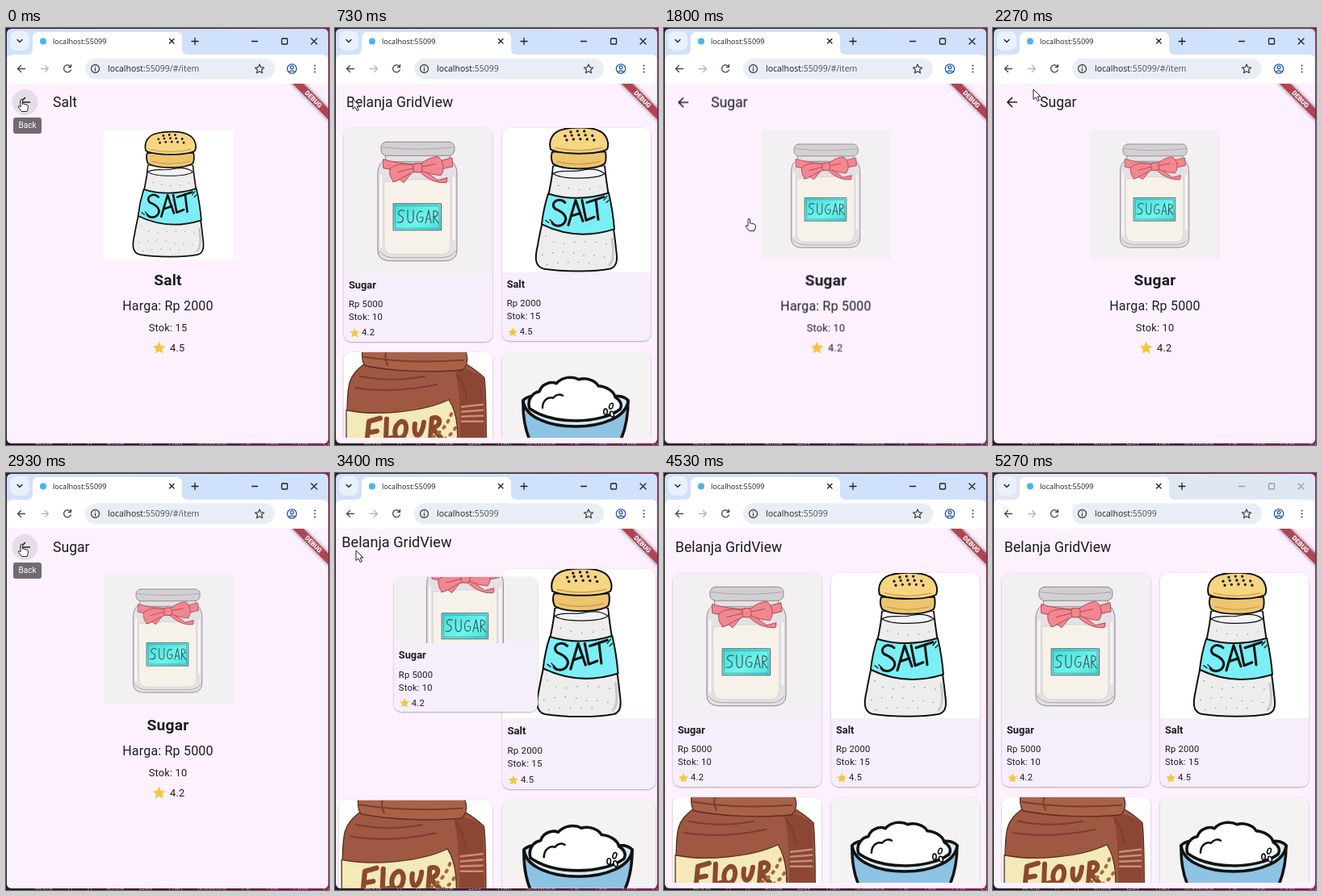
Write an HTML page that moves like this. It is 400 px wide and 517 px high and loops after 5340 ms.

```html
<!DOCTYPE html>
<html lang="id">
<head>
<meta charset="utf-8">
<title>Belanja GridView</title>
<style>
  :root { --t: 5340ms; }
  html, body { margin: 0; width: 100%; height: 100%; overflow: hidden; }
  .stage { position: relative; width: 400px; height: 517px; overflow: hidden;
    background: linear-gradient(90deg, #2a1a2c, #4a1838 60%, #8a1d5c); font-family: Roboto, sans-serif; color: #1d1b20; }
  .stage *, .stage { box-sizing: border-box; }
  .layer { position: absolute; left: 0; top: 0; width: 400px; height: 517px; }
  svg { display: block; }
  p { margin: 0; position: absolute; white-space: nowrap; }
  .below { left: 36px; top: 512px; font-size: 10px; line-height: 12px; color: #a5809a; word-spacing: 16px; }

  /* browser frame */
  .bar { animation: blur-bar var(--t) step-end infinite; }
  .ctl { animation: blur-ctl var(--t) step-end infinite; }
  .tab-title, .url { font-family: "Open Sans", sans-serif; }
  .tab-title { font-size: 9.1px; }
  .url { font-size: 10.5px; }
  .path { animation: path-on var(--t) step-end infinite; }
  @keyframes blur-bar { 0% { fill: #d0e1fb } 92% { fill: #dfe7f3 } }
  @keyframes blur-ctl { 0% { stroke: #1f1f1f } 92% { stroke: #999da3 } }
  @keyframes path-on { 0%, 28.8% { visibility: visible } 8.6%, 62% { visibility: hidden } }

  /* pages */
  .page { clip-path: inset(69px 1px 2px 1px round 0 0 6px 6px); background: #fdf1ff; }
  .title { font-size: 17.6px; line-height: 24px; top: 79.5px; }
  .grid { transform-origin: 200px 292px; animation: grid-zoom var(--t) linear infinite; }
  .cells { clip-path: inset(115px 0 9px 0); }
  .card { position: absolute; width: 184px; height: 264.5px; border-radius: 9.6px; overflow: hidden;
    background: #f6eefb; }
  .shade { position: absolute; width: 184px; height: 264.5px; border-radius: 9.6px;
    box-shadow: 0 .8px 2px rgba(0,0,0,.38); }
  .shade .card { width: 100%; height: 100%; }
  .pic { position: absolute; left: 0; top: 0; width: 100%; height: calc(100% - 85px); }
  .card p { left: 6px; font-size: 11.2px; line-height: 16px; letter-spacing: .2px; }
  .card .name { font-size: 12.8px; font-weight: 700; bottom: 62px; letter-spacing: 0; }
  .card .star { position: absolute; left: 6px; bottom: 3.5px; width: 14.4px; height: 14.4px; }
  .press { position: absolute; left: 8px; top: 121px; width: 189px; height: 271px;
    animation: press var(--t) step-end infinite; }
  .detail { background: #fdf1ff; transform-origin: 200px 292px; }
  .detail p { left: 0; width: 401px; text-align: center; letter-spacing: .2px; }
  .detail .title { left: 58px; text-align: left; letter-spacing: 0; }
  .detail .pic { left: 121px; top: 127px; width: 160px; height: 160px; }
  .detail .star { position: absolute; left: 180.4px; top: 387px; width: 19.2px; height: 19.2px; }
  .detail .num { left: 203px; text-align: left; top: 389px; font-size: 12.8px; line-height: 16px; }
  .tip { position: absolute; left: 9px; top: 111px; width: 35px; height: 20px; border-radius: 3px;
    background: #706b71; color: #fff; font-size: 10px; line-height: 20px; text-align: center; }

  @keyframes grid-zoom {
    0%, 8.33% { transform: scale(1.05); animation-timing-function: ease-in }
    10.39% { transform: scale(1.032); animation-timing-function: cubic-bezier(.1,.6,.2,1) }
    13.6%, 28.46% { transform: none; animation-timing-function: cubic-bezier(.4,0,.2,1) }
    34.08%, 61.61% { transform: scale(1.05); animation-timing-function: ease-in }
    63.67% { transform: scale(1.032); animation-timing-function: cubic-bezier(.1,.6,.2,1) }
    67.42%, 100% { transform: none }
  }
  @keyframes press {
    0%, 28.46% { background: transparent }
    22% { background: #f3e9f5 }
    26.2% { background: #e0d8e2 }
  }
  #salt-slot { animation: salt-slot var(--t) step-end infinite; }
  #sugar-slot { animation: sugar-slot var(--t) step-end infinite; }
  @keyframes salt-slot { 0% { visibility: hidden } 14.14% { visibility: visible } }
  @keyframes sugar-slot { 0%, 67.42% { visibility: visible } 28.46% { visibility: hidden } }

  #salt-page { animation: salt-page var(--t) linear infinite; }
  #salt-page .pic, #salt-page .hover, #salt-page .tip { animation: salt-rest var(--t) step-end infinite; }
  #sugar-page { animation: sugar-page var(--t) linear infinite; }
  #sugar-page .pic { animation: sugar-rest var(--t) step-end infinite; }
  #sugar-page .hover { animation: sugar-hover var(--t) linear infinite; }
  #sugar-page .tip { animation: sugar-tip var(--t) linear infinite; }
  @keyframes salt-page {
    0%, 8.33% { opacity: 1; transform: none }
    10.1% { opacity: 0; transform: scale(.95) }
    100% { opacity: 0 }
  }
  @keyframes salt-rest { 0% { visibility: visible } 8.33% { visibility: hidden } }
  @keyframes sugar-page {
    0%, 28.46% { opacity: 0; transform: scale(.85) }
    29.2% { opacity: 0; transform: scale(.87) }
    30% { opacity: 1; transform: scale(.92); animation-timing-function: ease-out }
    34.08%, 61.61% { opacity: 1; transform: none }
    63.3% { opacity: 0; transform: scale(.95) }
    100% { opacity: 0; transform: scale(.85) }
  }
  @keyframes sugar-rest { 0%, 61.61% { visibility: hidden } 34.08% { visibility: visible } }
  @keyframes sugar-hover { 0%, 46.5% { opacity: 0 } 47%, 61.5% { opacity: 1 } 62%, 100% { opacity: 0 } }
  @keyframes sugar-tip { 0%, 47% { opacity: 0 } 49.5%, 61.5% { opacity: 1 } 62%, 100% { opacity: 0 } }

  /* shared-element flights */
  #salt-fly { animation: salt-fly var(--t) linear infinite, salt-air var(--t) step-end infinite; }
  #sugar-fly { animation: sugar-fly var(--t) linear infinite, sugar-air var(--t) step-end infinite; }
  #push-fly { animation: push-fly var(--t) linear infinite, push-air var(--t) step-end infinite; }
  @keyframes salt-fly {
    0%, 8.33% { left: 124px; top: 130px; width: 154px; height: 154px; animation-timing-function: ease-in }
    10.39% { left: 150px; top: 129.5px; width: 178px; height: 165px; animation-timing-function: cubic-bezier(.15,.55,.4,1) }
    14.14%, 100% { left: 207px; top: 124px; width: 184px; height: 264.5px }
  }
  @keyframes sugar-fly {
    0%, 61.61% { left: 124px; top: 130px; width: 154px; height: 154px; animation-timing-function: ease-in }
    63.67% { left: 74px; top: 129.5px; width: 178px; height: 165px; animation-timing-function: cubic-bezier(.15,.55,.4,1) }
    67.42%, 100% { left: 11px; top: 124px; width: 184px; height: 264.5px }
  }
  @keyframes push-fly {
    0%, 28.46% { left: 8px; top: 121px; width: 190px; height: 271px; animation-timing-function: ease-in }
    30.52% { left: 36px; top: 122px; width: 190px; height: 208px; animation-timing-function: cubic-bezier(.15,.55,.3,1) }
    34.08%, 100% { left: 121px; top: 127px; width: 160px; height: 160px }
  }
  @keyframes salt-air { 0%, 14.14% { visibility: hidden } 8.33% { visibility: visible } }
  @keyframes sugar-air { 0%, 67.42% { visibility: hidden } 61.61% { visibility: visible } }
  @keyframes push-air { 0%, 34.08% { visibility: hidden } 28.46% { visibility: visible } }

  /* pointer */
  .pointer { position: absolute; left: 0; top: 0; overflow: visible; animation: move var(--t) ease-in-out infinite; }
  .arrow { animation: arrow var(--t) step-end infinite; }
  .hand { animation: hand var(--t) step-end infinite; }
  @keyframes move {
    0%, 9% { transform: translate(19px, 88px) }
    13%, 17% { transform: translate(22px, 88px) }
    25.5%, 34% { transform: translate(105px, 236px) }
    41.5%, 43% { transform: translate(50px, 76px) }
    48%, 61.6% { transform: translate(19px, 88px) }
    63.67%, 65% { transform: translate(26px, 96px) }
    71.8%, 73.5% { transform: translate(317px, 83px) }
    81%, 100% { transform: translate(396px, -22px) }
  }
  @keyframes arrow {
    0%, 22%, 46.5%, 81% { visibility: hidden }
    9%, 34.5%, 62% { visibility: visible }
  }
  @keyframes hand {
    0%, 22%, 46.5% { visibility: visible }
    9%, 34.5%, 62% { visibility: hidden }
  }
</style>
</head>
<body>
<svg width="0" height="0" style="position:absolute">
  <defs>
    <symbol id="star" viewBox="0 0 24 24">
      <path fill="#f4c53d" d="M12 17.27L18.18 21l-1.64-7.03L22 9.24l-7.19-.61L12 2 9.19 8.63 2 9.24l5.46 4.73L5.82 21z"/>
    </symbol>
    <linearGradient id="aqua" x2="1" y2="1">
      <stop stop-color="#3fdcd8"/><stop offset=".6" stop-color="#6ff5ee"/><stop offset="1" stop-color="#44dbd8"/>
    </linearGradient>

    <g id="sugar" stroke-linejoin="round" stroke-linecap="round">
      <path fill="#f2f0f2" d="M0 0H184V184H0z"/>
      <g stroke="#8d8489">
        <path fill="#e4e0e4" d="M50 42C44 46 42 52 42 60V154Q42 166 56 167H126Q140 166 140 154V60C140 52 138 46 132 42z"/>
        <path fill="#f6f2e9" stroke="#d9d3cf" d="M50 69Q91 63 132 69V148Q131 158 122 159H60Q51 158 50 148z"/>
        <path fill="none" stroke="#faf8fa" stroke-width="2.500" d="M46 62V150M136 64V140"/>
        <path fill="none" stroke="#aaa2a8" d="M44 155Q50 163 62 163H122Q134 162 138 155"/>
        <path fill="#e4e1e5" d="M52 34H131V44H52z"/>
        <rect x="46" y="19.500" width="91" height="17" rx="7" fill="#d3d0d4"/>
        <path fill="none" stroke="#aaa4a9" d="M48 26Q91 31 135 26"/>
      </g>
      <g fill="#f3868f" stroke="#a84d5b">
        <path d="M49 41Q88 53 134 39L135 50Q90 63 49 52z"/>
        <path d="M87 54L74 70 69 66 60 69 81 53zM97 53L116 67 128 64 127 70Q110 72 93 56z"/>
        <path d="M88 49C77 46 64 46 57 53 56 60 58 66 63 69 74 63 83 58 89 56zM95 47C101 42 111 37 117 38 124 44 125 54 120 61 110 60 102 58 96 55z"/>
        <rect x="86" y="46" width="11" height="11" rx="3"/>
        <path fill="none" d="M86 52L67 57M98 50L113 47"/>
      </g>
      <rect x="61.500" y="96" width="59" height="33" fill="url(#aqua)" stroke="#5d6064"/>
      <rect x="64" y="98.500" width="54" height="28" fill="none" stroke="#2f8f92" stroke-width=".7"/>
      <path fill="none" stroke="#41595d" stroke-width="1.200" d="M75 105C68 102 65 109 70 111 76 113 74 121 66 119M79 104V114C79 122 86 121 86 114V104M97 106C90 102 88 119 94 119 98 119 98 115 98 113H94M101 120L105 104 108 120M102 115H107M111 120V105C118 104 118 112 111 112L117 120"/>
    </g>

    <g id="salt" stroke="#111" stroke-width="2" stroke-linejoin="round" stroke-linecap="round">
      <path fill="#fff" stroke="none" d="M0 0H184V184H0z"/>
      <path fill="#eeedee" d="M63 50C61 80 50 112 44 148 40 165 41 174 51 177 75 181 115 181 134 177 143 174 143 165 141 152 138 120 130 80 127 50z"/>
      <path fill="#fff" stroke="none" d="M64 50H126L127 59Q95 68 63 59z"/>
      <path fill="#f4f3f4" stroke-width="1.200" d="M63 59C73 53 88 58 98 55 112 52 122 55 127 59 118 66 74 67 63 59z"/>
      <path fill="none" stroke="#c9c8ca" stroke-width="3" d="M136 140Q140 166 133 172"/>
      <path fill="#7beff5" d="M57 84Q93 95 132 83 137 104 139 128 92 143 49 122 51 103 57 84z"/>
      <path fill="none" stroke-width="3" d="M78 95C70 87 58 96 66 103 76 107 82 113 77 120 72 126 64 124 62 120M82 123L91 92 100 118M85 112L97 108M99 92L104 117 114 113M105 95L126 88M116 91L119 116"/>
      <path fill="none" stroke-width="1.300" d="M126 92l4-5M129 95l3-3M54 117l4 3M59 116l3 3"/>
      <path fill="none" stroke="#777" stroke-width="1.400" stroke-dasharray="0 13" d="M54 136Q64 150 88 144 120 142 134 148M50 160Q80 152 104 162 124 158 136 168M56 172Q86 166 120 172M70 74Q100 84 124 74"/>
      <path fill="#eec56f" d="M62 32C60 38 61 43 63 47 75 55 115 55 127 47 129 43 129 38 128 32z"/>
      <path fill="#f6d583" d="M60 29C57 18 62 7 76 4 88 1 111 1 120 6 130 10 133 22 130 29 118 36 73 36 60 29z"/>
      <path fill="none" stroke="#c79a4c" stroke-width="1.200" d="M66 27Q94 34 124 27M68 44Q94 51 122 44"/>
      <path fill="none" stroke-width="3.300" stroke-dasharray="0 8.500" d="M85 7.500Q96 5 110 7.500M78 12.500Q95 10 116 12.500M80 17.500Q96 15 114 17.500"/>
    </g>

    <g id="flour" stroke="#5c2c1e" stroke-width="1.300" stroke-linejoin="round" stroke-linecap="round">
      <path fill="#fff" stroke="none" d="M0 0H184V184H0z"/>
      <path fill="#9f5842" d="M26 16C16 24 10 30 7 40 3 55 4 80 3 184H176C177 80 176 50 174 34 168 28 160 22 150 16z"/>
      <path fill="#8c4634" stroke="none" d="M136 20C154 22 166 28 173 35L176 184H143C146 80 144 45 136 20z"/>
      <path fill="none" stroke="#7d3d2c" stroke-width="2" d="M20 32Q60 40 100 32M14 46Q60 54 116 42M140 30Q150 42 152 60"/>
      <path fill="#f3e9b9" d="M3 74C40 82 100 76 130 61 141 78 143 100 139 150H3z"/>
      <path fill="#a9624a" d="M23 0C22 8 23 14 26 19 60 26 110 28 147 24 154 18 154 8 150 0z"/>
      <path fill="none" stroke="#7d3d2c" stroke-width="2" d="M25 8Q80 17 148 12M52 3Q50 10 54 18"/>
      <path fill="none" stroke="#8b492d" stroke-width="6" d="M28 118L31 88 45 84M30 102L41 100M53 85L52 110 61 108M71 88C61 92 61 109 69 109 79 107 80 87 71 88M88 91C85 111 97 109 99 89M107 109L109 84C122 80 121 95 109 96L120 108"/>
      <path fill="none" stroke="#a8683a" stroke-width="4" stroke-dasharray="2 7" d="M110 108Q128 96 134 76M124 110Q134 104 138 96"/>
      <path fill="none" stroke="#c78f78" stroke-width="2.500" d="M146 70L172 67M146 76L172 74M146 82L172 81M146 88L172 88"/>
    </g>

    <g id="rice" stroke="#111" stroke-width="3.500" stroke-linejoin="round" stroke-linecap="round">
      <path fill="#f4f2f3" stroke="none" d="M0 0H184V184H0z"/>
      <path fill="#8dc3e3" d="M26 62C25 95 35 125 60 145H120C146 125 156 95 156 62Q150 56 140 57H42Q32 56 26 62z"/>
      <path fill="#d5e9f3" d="M26 62C30 105 152 105 156 62Q150 56 140 57H42Q32 56 26 62z"/>
      <path fill="#fff" d="M34 72C30 60 39 52 46 51 49 41 61 38 67 41 75 32 88 32 95 36 105 33 116 38 119 44 131 45 139 52 140 58 147 62 149 68 146 73 120 92 62 92 34 72z"/>
      <path fill="none" stroke-width="2.500" d="M50 71C50 61 58 57 63 59 67 54 72 54 75 56"/>
      <g fill="#fff" stroke-width="1.600">
        <ellipse cx="135" cy="69" rx="2.200" ry="3.600" transform="rotate(20 135 69)"/>
        <ellipse cx="128" cy="76" rx="2.200" ry="3.600"/>
        <ellipse cx="136" cy="79" rx="2.200" ry="3.600" transform="rotate(-20 136 79)"/>
      </g>
    </g>
  </defs>
</svg>

<div class="stage">
  <p class="below">main 0 0 build Hot Tidy Warning Ln Tab Live Spaces</p>

  <svg class="layer" viewBox="0 0 400 517" fill="none" stroke-width="1.300" stroke-linecap="round" stroke-linejoin="round">
    <path class="bar" d="M1 69V7Q1 1 7 1H393Q399 1 399 7V69z"/>
    <rect x="5" y="4" width="24" height="24" rx="8" fill="#e9f1fe"/>
    <path fill="#fff" d="M1 69V41Q1 33 9 33H26Q33 33 33 26V13Q33 5 41 5H210Q218 5 218 13V26Q218 33 225 33H391Q399 33 399 41V69z"/>
    <circle cx="46" cy="16.500" r="4" fill="#45b5f0"/>
    <rect x="98" y="37.500" width="235" height="26" rx="13" fill="#e9eef6"/>
    <g stroke="#1f1f1f">
      <path d="M14 14.500l3 3 3-3M202.500 13.500l5.500 5.500m0-5.500l-5.500 5.500M230 16.500h8M234 12.500v8"/>
    </g>
    <g class="ctl">
      <path d="M304.500 16.500h7M378 13l7 7m0-7l-7 7"/>
      <rect x="341.500" y="13" width="7" height="7" rx="1"/>
    </g>
    <g stroke="#474747">
      <path d="M23.500 50.500h-9m4-4l-4 4 4 4"/>
      <path stroke="#b4b6ba" d="M43.500 50.500h9m-4-4l4 4-4 4"/>
      <path d="M80 48a4.500 4.500 0 1 0 .3 4M80.500 45.500v3h-3"/>
      <circle cx="110.500" cy="50.500" r="5"/>
      <path d="M110.500 50v3M110.500 47.800v.1"/>
      <path d="M314 45l1.600 3.700 4 .4-3 2.700.9 4-3.500-2.100-3.500 2.100.9-4-3-2.700 4-.4z"/>
    </g>
    <g stroke="#2259b5">
      <circle cx="354" cy="50.500" r="5.700"/><circle cx="354" cy="48.700" r="1.900"/><path d="M350 54.500q4-3 8 0"/>
    </g>
    <path stroke="#474747" stroke-width="2.200" d="M382.500 46.500v0M382.500 50.500v0M382.500 54.500v0"/>
    <text class="tab-title" x="58" y="20" fill="#1f1f1f">localhost:55099</text>
    <text class="url" x="126" y="54.300" fill="#1f1f1f">localhost<tspan fill="#4d5156">:55099</tspan><tspan class="path" fill="#4d5156">/#/item</tspan></text>
  </svg>

  <div class="layer page" id="page">
    <div class="layer grid">
      <p class="title" style="left:14px">Belanja GridView</p>
      <div class="layer cells" id="cells"><div class="press"></div></div>
    </div>
    <svg class="layer" id="banner" viewBox="0 0 400 517">
      <g transform="translate(400 69) rotate(45)">
        <rect x="-36" y="22.400" width="72" height="9.600" fill="#b04453" style="filter:drop-shadow(0 0 2.500px rgba(0,0,0,.5))"/>
        <text y="30.100" fill="#fff" font-size="8.200" font-weight="900" text-anchor="middle">DEBUG</text>
      </g>
    </svg>
  </div>

  <svg class="pointer" width="20" height="24" stroke="#222" stroke-width="1" stroke-linejoin="round" fill="#fff">
    <path class="arrow" d="M0 0V12.500L3 9.800 5.200 14.600 7.300 13.600 5.200 9H9z"/>
    <path class="hand" d="M-1 1.200Q0-.5 1.400 1V6.300Q2.800 5.300 3.700 6.600 5.200 5.800 6 7.200 8 6.600 8.300 8.600V11.500L7 15.500H.5L-3.600 10.200Q-4 8.400-2.400 8.700L-1 10z"/>
  </svg>
</div>

<script>
  const items = [
    { art: 'sugar', name: 'Sugar', price: 5000, stock: 10, rating: 4.2, x: 11, y: 124 },
    { art: 'salt', name: 'Salt', price: 2000, stock: 15, rating: 4.5, x: 207, y: 124 },
    { art: 'flour', name: 'Flour', price: 3000, stock: 20, rating: 4.3, x: 11, y: 401.5 },
    { art: 'rice', name: 'Rice', price: 9000, stock: 12, rating: 4.6, x: 207, y: 401.5 }
  ];

  const pic = (art, id = '') =>
    `<svg class="pic" ${id && `id="${id}"`} viewBox="0 0 184 184" preserveAspectRatio="xMidYMid slice"><use href="#${art}"/></svg>`;
  const star = '<svg class="star"><use href="#star"/></svg>';

  const card = (it, id) => `
    <div class="shade" id="${id}" style="left:${it.x}px;top:${it.y}px"><div class="card">
      ${pic(it.art)}
      <p class="name">${it.name}</p>
      <p style="bottom:37.5px">Rp ${it.price}</p>
      <p style="bottom:21.5px">Stok: ${it.stock}</p>
      ${star}<p style="left:22px;bottom:2.5px">${it.rating}</p>
    </div></div>`;

  const line = (text, y, size, weight = 400) =>
    `<p style="top:${y - 12}px;font:${weight} ${size}px/24px Roboto,sans-serif">${text}</p>`;

  const detail = it => `
    <div class="layer detail" id="${it.art}-page">
      <svg class="layer" viewBox="0 0 400 517">
        <circle class="hover" cx="23.500" cy="92" r="16" fill="#e6dce8"/>
        <path d="M30 92H18M24 86l-6 6 6 6" fill="none" stroke="#1d1b20" stroke-width="1.600"/>
      </svg>
      <p class="title">${it.name}</p>
      ${pic(it.art)}
      ${line(it.name, 313, 19.2, 700)}
      ${line('Harga: Rp ' + it.price, 344.5, 16)}
      ${line('Stok: ' + it.stock, 371.5, 12.8)}
      ${star}<p class="num">${it.rating}</p>
      <div class="tip">Back</div>
    </div>`;

  const [sugar, salt] = items;
  const add = (id, where, html) => document.getElementById(id).insertAdjacentHTML(where, html);
  add('cells', 'beforeend', items.map(it => card(it, it.art + '-slot')).join(''));
  add('banner', 'beforebegin', detail(salt) + detail(sugar) +
    card(salt, 'salt-fly') + card(sugar, 'sugar-fly') + pic('sugar', 'push-fly'));
</script>
</body>
</html>
```
